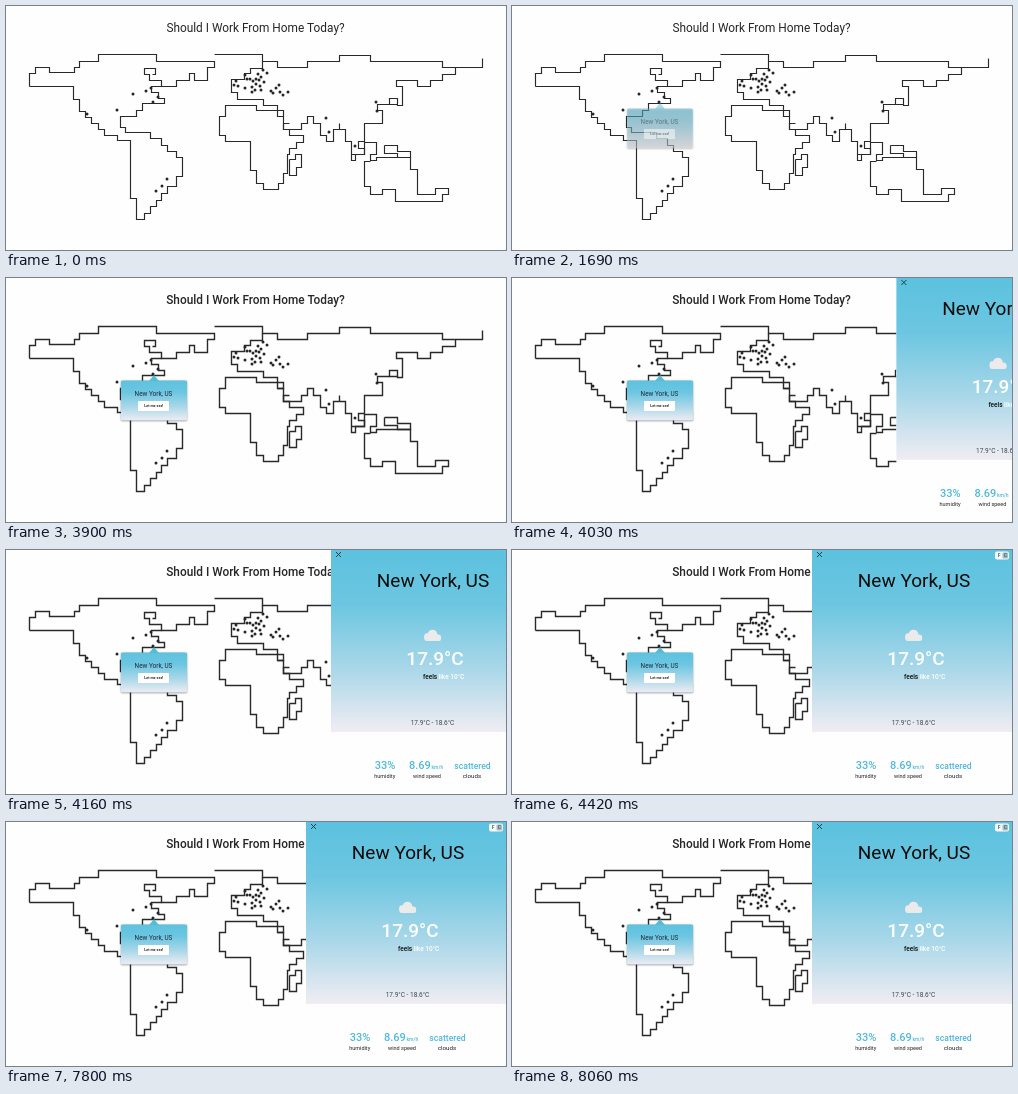
An HTML page with a canvas for the animation above (9490 ms loop, 500 by 244 pixels).

```html
<!DOCTYPE html>
<html lang="en">
<head>
<meta charset="utf-8">
<title>Should I Work From Home Today?</title>
<style>
html, body { margin: 0; width: 100%; height: 100%; overflow: hidden; background: #fefefe; }
canvas { display: block; width: 500px; height: 244px; }
</style>
</head>
<body>
<canvas id="stage"></canvas>
<script>
const W = 500, H = 244, LOOP = 9490, STEP = 130, CELL = 6.3;
const canvas = document.getElementById('stage');
const ctx = canvas.getContext('2d');
const dpr = window.devicePixelRatio || 1;
canvas.width = W * dpr;
canvas.height = H * dpr;

const FONT = 'Roboto, Arial, sans-serif';
const BLUE = '#4fb9dc';

// Joins points by stairs of about one cell, each going across, then up or down.
function coast(...points) {
  const path = new Path2D();
  let [x, y] = points[0];
  path.moveTo(x, y);
  for (const [px, py] of points.slice(1)) {
    const dx = px - x, dy = py - y;
    const n = Math.max(1, Math.round(Math.min(Math.abs(dx), Math.abs(dy)) / CELL));
    for (let i = 1; i <= n; i++) {
      const sx = Math.round(x + dx * i / n);
      path.lineTo(sx, Math.round(y + dy * (i - 1) / n));
      path.lineTo(sx, Math.round(y + dy * i / n));
    }
    x = px;
    y = py;
  }
  return path;
}

const arctic = coast([23, 80], [23, 67], [29, 61], [43, 66], [68, 61], [73, 55], [92, 48],
  [208, 61], [201, 74], [188, 67], [183, 74], [170, 80], [155, 74], [143, 68],
  [138, 62], [149, 68], [146, 68]);

const americas = coast([155, 80], [145, 86], [152, 92], [158, 97], [136, 104], [130, 110],
  [114, 110], [114, 121], [119, 126], [144, 132], [155, 139], [161, 145], [170, 151],
  [176, 170], [170, 180], [161, 187], [144, 207], [138, 213], [130, 192], [124, 134],
  [111, 129], [98, 123], [79, 105], [73, 93], [67, 80], [23, 80]);

const siberia = coast([208, 48], [256, 55], [271, 61], [301, 55], [333, 49], [364, 55],
  [436, 61], [476, 52]);

const europe = coast([256, 55], [256, 62], [244, 67], [238, 73], [225, 73], [225, 86],
  [231, 93], [257, 99], [271, 104], [277, 110], [271, 110]);

const pacific = coast([449, 61], [449, 68], [436, 74], [424, 80], [411, 74], [390, 80],
  [396, 99], [391, 92], [383, 98], [391, 98]);

const asia = coast([383, 98], [371, 104], [376, 117], [358, 117], [358, 135], [352, 142],
  [358, 148], [349, 154], [345, 135], [339, 123], [333, 117], [333, 123], [327, 135],
  [320, 129], [314, 117], [307, 110], [301, 117], [295, 123], [277, 117], [283, 117]);

const africa = coast([219, 104], [219, 99], [250, 104], [271, 110], [277, 123], [283, 129],
  [297, 136], [290, 142], [283, 148], [281, 167], [277, 177], [272, 183], [257, 177],
  [250, 164], [244, 135], [219, 129], [213, 110], [219, 104]);

const madagascar = coast([283, 153], [289, 148], [295, 161], [290, 169], [283, 153]);

const australia = coast([345, 148], [358, 148], [358, 136], [370, 136], [370, 148],
  [364, 154], [370, 151], [404, 151], [404, 163], [411, 188], [429, 182], [442, 188],
  [436, 195], [389, 195], [389, 183], [376, 188], [364, 180], [358, 155], [364, 155]);

const guinea = coast([378, 139], [391, 145], [404, 151], [391, 147], [378, 139]);

const coasts = [arctic, americas, siberia, europe, pacific, asia, africa, madagascar,
  australia, guinea];

const westCities = [[81, 108], [111, 104], [127, 88], [140, 85], [145, 82], [152, 91],
  [147, 96], [150, 185], [156, 180], [161, 173]];
const euroCities = [[228, 79], [230, 75], [232, 80], [239, 69], [241, 73], [244, 73],
  [247, 75], [250, 73], [252, 68], [257, 64], [261, 67], [255, 71], [253, 74], [258, 76],
  [250, 78], [246, 81], [239, 82], [246, 86], [249, 84], [254, 80], [255, 84], [265, 85],
  [267, 87], [270, 82], [273, 79], [274, 86], [277, 89], [282, 86]];
const eastCities = [[320, 112], [323, 126], [370, 96], [371, 105], [349, 140]];
const cities = [...westCities, ...euroCities, ...eastCities];

function text(s, x, y, size, color, weight = 400, align = 'center') {
  ctx.font = `${weight} ${size}px ${FONT}`;
  ctx.textAlign = align;
  ctx.fillStyle = color;
  ctx.fillText(s, x, y);
}

function box(x, y, w, h, r, color) {
  ctx.fillStyle = color;
  ctx.beginPath();
  ctx.roundRect(x, y, w, h, r);
  ctx.fill();
}

function sky(y, h) {
  const g = ctx.createLinearGradient(0, y, 0, y + h);
  g.addColorStop(0, '#5cc2df');
  g.addColorStop(0.3, '#6cc6e1');
  g.addColorStop(0.65, '#a9d7e9');
  g.addColorStop(1, '#f0edf3');
  return g;
}

function drawMap(bold) {
  text('Should I Work From Home Today?', 249.5, 26, 11.85, '#262626', bold ? 500 : 400);
  ctx.save();
  ctx.translate(0.5, 0.5);
  ctx.strokeStyle = '#292929';
  ctx.lineWidth = bold ? 1.4 : 1.15;
  coasts.forEach(c => ctx.stroke(c));
  ctx.restore();
  ctx.fillStyle = '#262626';
  for (const [x, y] of cities) {
    ctx.beginPath();
    ctx.arc(x, y, 1.5, 0, 7);
    ctx.fill();
  }
}

function drawPopup(alpha) {
  ctx.save();
  ctx.globalAlpha = alpha;
  ctx.save();
  ctx.shadowColor = 'rgba(0,0,0,.5)';
  ctx.shadowBlur = 2 * dpr;
  ctx.shadowOffsetY = 0.5 * dpr;
  box(115, 102.5, 66, 40, 1.5, sky(102, 41));
  ctx.restore();
  ctx.fillStyle = '#5cb9d6';
  ctx.beginPath();
  ctx.moveTo(143, 103);
  ctx.lineTo(148, 97);
  ctx.lineTo(153, 103);
  ctx.fill();
  text('New York, US', 147.5, 117.5, 6.4, '#1d2b33');
  box(132, 123, 31, 10, 1, '#fff');
  text('Let me see!', 147.8, 129.3, 3.7, '#222', 700);
  ctx.restore();
}

function drawCloud() {
  ctx.fillStyle = '#eceaea';
  ctx.beginPath();
  ctx.arc(397, 87, 4, 0, 7);
  ctx.arc(401.5, 84.5, 4.8, 0, 7);
  ctx.arc(407, 87.8, 3.2, 0, 7);
  ctx.fill();
  box(393.5, 86, 16.5, 5, 2.5, '#eceaea');
}

function drawToggle(metric) {
  box(483, 1.5, 14, 8, 2, '#f7fafb');
  box(metric ? 490.5 : 484.5, 2.5, 5.5, 6, 1, metric ? '#a9bcc5' : '#7cc5de');
  text('F', 487, 7.4, 5, '#45545c', 500);
  text('C', 493.3, 7.4, 5, '#45545c', 500);
}

function drawPanel(left, metric) {
  const temp = metric ? '17.9°C' : '64.2°F';
  const high = metric ? '18.6°C' : '65.5°F';
  ctx.save();
  ctx.translate(left - 300, 0);
  ctx.fillStyle = '#fefefe';
  ctx.fillRect(300, 0, 200, H);
  ctx.fillStyle = sky(0, 182);
  ctx.fillRect(300, 0, 200, 182);

  ctx.strokeStyle = '#17313c';
  ctx.lineWidth = 0.9;
  ctx.beginPath();
  ctx.moveTo(305, 2);
  ctx.lineTo(310, 7);
  ctx.moveTo(310, 2);
  ctx.lineTo(305, 7);
  ctx.stroke();

  drawToggle(metric);
  text('New York, US', 402, 37, 19, '#0b0b0b');
  drawCloud();
  text(temp, 404, 115, 19, '#fff', 500);
  text('feels', 392, 129, 6.5, '#111', 500, 'left');
  text(metric ? 'like 10°C' : 'like 50°F', 407.5, 129, 6.5, '#fff', 500, 'left');
  text(`${temp} - ${high}`, 401.5, 175.3, 6.5, '#3f474d');

  text('33%', 354, 218.5, 11, BLUE, 500);
  text('8.69', 378, 218.5, 11, BLUE, 500, 'left');
  text('km/h', 400.5, 218.5, 5, BLUE, 500, 'left');
  text('scattered', 441.5, 218.5, 8.6, BLUE, 500);
  text('humidity', 353.7, 228.3, 5.5, '#222');
  text('wind speed', 396, 228.3, 5.5, '#222');
  text('clouds', 441, 228.3, 6.2, '#222');
  ctx.restore();
}

function draw(time) {
  const t = Math.floor((time % LOOP) / STEP) * STEP;
  ctx.setTransform(dpr, 0, 0, dpr, 0, 0);
  ctx.fillStyle = '#fefefe';
  ctx.fillRect(0, 0, W, H);
  drawMap(t >= 2210);
  if (t >= 1560) drawPopup(Math.min(1, (t - 1430) / 520));
  if (t > 3900) {
    const rest = Math.max(0, 1 - (t - 3900) / 520);
    drawPanel(300 + 200 * rest ** 3, t < 6240 || t >= 7800);
  }
}

const start = performance.now();
function tick() {
  draw(performance.now() - start);
  requestAnimationFrame(tick);
}
tick();
</script>
</body>
</html>
```
